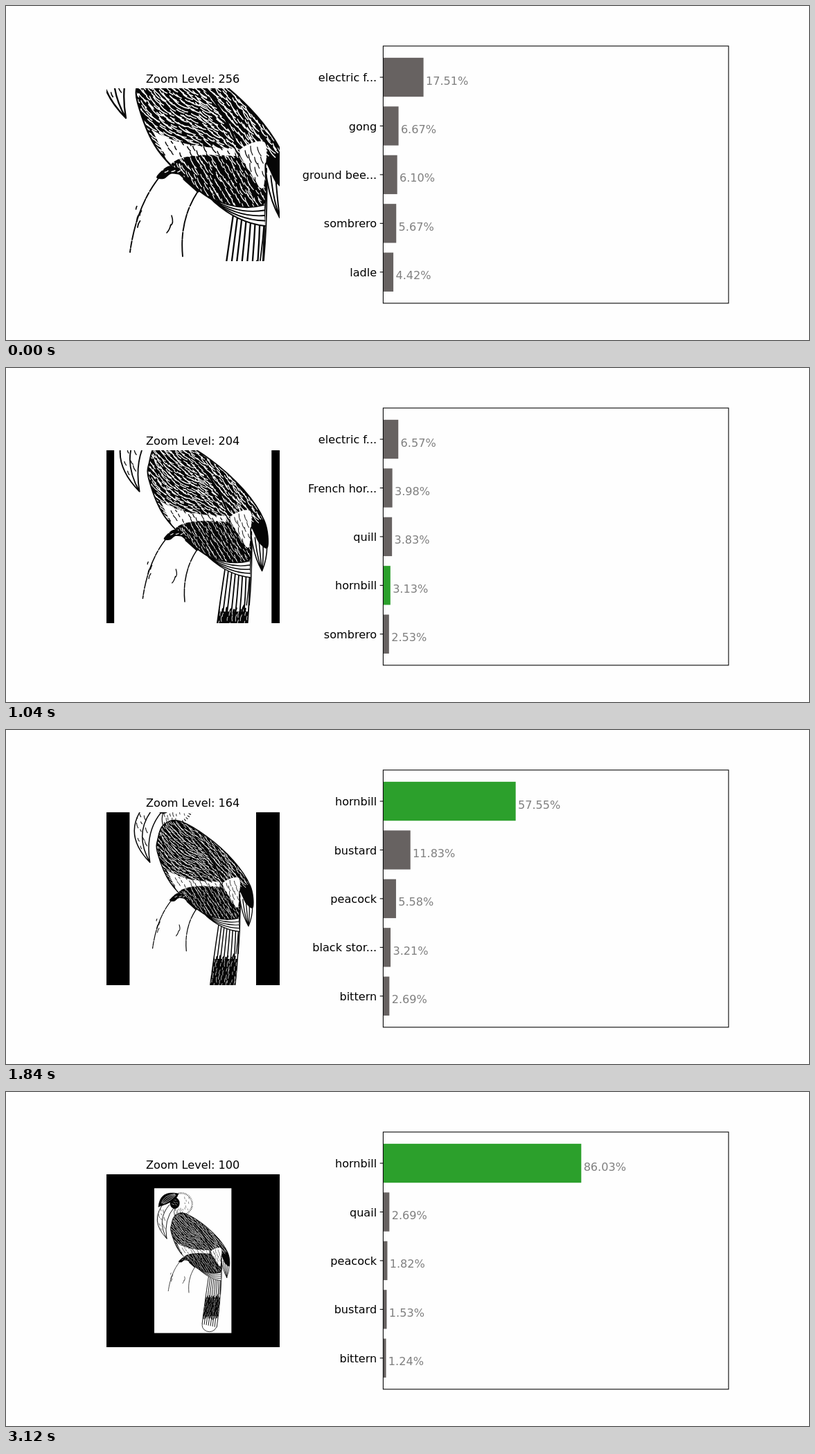
Write an HTML page that moves like this. It is 1159 px wide and 483 px high and loops after 8.18 s.

```html
<!DOCTYPE html>
<html lang="en">
<head>
<meta charset="utf-8">
<title>Zoom level and predictions</title>
<style>
html, body { margin: 0; width: 100%; height: 100%; overflow: hidden; background: #fefefe; }
svg { display: block; width: 1159px; height: 483px; }
text { font: 16.1px "DejaVu Sans", sans-serif; white-space: pre; }
</style>
</head>
<body>
<svg id="stage" viewBox="0 0 1159 483"></svg>
<script>
const STEP = 80, LAST = 39, LOOP = 8180;
const CX = 269.7, CY = 243.9;
const AXIS = 544.4, TOP = 57.9, PITCH = 70.44, PER = 3.3233;
const INK = '#060606', PAPER = '#fefefe';

// Predictions in percent at certain steps; the steps between are eased.
const KEYS = [
  [0, { 'electric f...': 17.51, 'gong': 6.67, 'ground bee...': 6.10, 'sombrero': 5.67, 'ladle': 4.42 }],
  [8, { 'electric f...': 7.43, 'quill': 4.13, 'French hor...': 2.80, 'sombrero': 2.56, 'gong': 2.36 }],
  [17, { 'French hor...': 9.71, 'hornbill': 9.15, 'peacock': 4.39, 'ground bee...': 3.49, 'zebra': 3.01 }],
  [23, { 'hornbill': 57.55, 'bustard': 11.83, 'peacock': 5.58, 'black stor...': 3.21, 'bittern': 2.69 }],
  [29, { 'hornbill': 60.05, 'peacock': 4.25, 'bustard': 3.57, 'zebra': 2.83, 'fly': 2.83 }],
  [33, { 'hornbill': 92.04, 'peacock': 1.89, 'bustard': 0.95, 'quail': 0.58, 'vulture': 0.38 }],
  [39, { 'hornbill': 86.03, 'quail': 2.69, 'peacock': 1.82, 'bustard': 1.53, 'bittern': 1.24 }]
];

const stage = document.getElementById('stage');

function add(parent, tag, attrs) {
  const el = document.createElementNS('http://www.w3.org/2000/svg', tag);
  for (const k in attrs) el.setAttribute(k, attrs[k]);
  parent.appendChild(el);
  return el;
}

let seed = 11;
function rnd() {
  seed = (seed * 16807) % 2147483647;
  return seed / 2147483647;
}

const points = list => list.split(' ').map(s => s.split(',').map(Number));
const mix = (a, b, k) => a + (b - a) * k;

// Closed smooth outline through a few points.
function blob(list) {
  const p = points(list), n = p.length, at = i => p[(i + n) % n];
  let d = 'M' + p[0];
  p.forEach((b, i) => {
    const a = at(i - 1), c = at(i + 1), e = at(i + 2);
    d += `C${b.map((v, k) => v + (c[k] - a[k]) / 6)} ${c.map((v, k) => v - (e[k] - b[k]) / 6)} ${c}`;
  });
  return d + 'Z';
}

// An arc is "start control end"; a leaf is the area between two arcs.
const arc = list => { const [a, b, c] = points(list); return `M${a}Q${b} ${c}`; };
function leaf(one, two) {
  const [a, b, c] = points(two);
  return `${arc(one)}L${c}Q${b} ${a}Z`;
}

// Arcs blended evenly between two arcs, both ends included.
function fan(one, two, n) {
  const p = points(one), q = points(two);
  let d = '';
  for (let i = 0; i <= n; i++) {
    d += arc(p.map((a, j) => a.map((v, k) => mix(v, q[j][k], i / n))).join(' '));
  }
  return d;
}

// Jittered short strokes over a box, turned by angle(x, y) in degrees.
function hatch(x0, y0, x1, y1, gx, gy, len, angle) {
  let d = '', row = 0;
  for (let y = y0; y < y1; y += gy, row++) {
    for (let x = x0 + (row % 2) * gx / 2; x < x1; x += gx) {
      const px = x + (rnd() - 0.5) * gx * 0.6, py = y + (rnd() - 0.5) * gy * 0.6;
      const a = (angle(px, py) + (rnd() - 0.5) * 18) * Math.PI / 180;
      const l = len * (0.5 + rnd() * 0.9), c = Math.cos(a) * l, s = Math.sin(a) * l;
      d += `M${px - c / 2} ${py - s / 2}q${c / 2 - s / 7} ${s / 2 + c / 7} ${c} ${s}`;
    }
  }
  return d;
}

const defs = add(stage, 'defs', {});
function clip(id, d) {
  add(add(defs, 'clipPath', { id }), 'path', { d });
  return `url(#${id})`;
}

add(stage, 'rect', { width: 1159, height: 483, fill: PAPER });
const view = add(stage, 'g', { 'clip-path': clip('view', 'M145 119h250v250h-250z') });
const backdrop = add(view, 'rect', { x: 145, y: 119, width: 250, height: 250 });
const bird = add(view, 'g', { 'stroke-linecap': 'round', 'stroke-linejoin': 'round' });

const fill = (d, color, width = 0) =>
  add(bird, 'path', { d, fill: color, stroke: INK, 'stroke-width': width });
const line = (d, width, color = INK, more = {}) =>
  add(bird, 'path', { d, fill: 'none', stroke: color, 'stroke-width': width, ...more });

function drawBranch() {
  const rough = { 'stroke-dasharray': '24 2.5 9 2' };
  line(arc('221,248 188,290 179,356'), 1.9, INK, rough);
  line(arc('277,268 250,309 255,362'), 1.9, INK, rough);
  line(hatch(190, 292, 196, 324, 6, 8, 8, () => 110), 1.7);
  line(arc('239,303 243,315 237,318') + arc('238,316 236,324 232,328'), 1.6);
}

function drawTail() {
  const left = '328,302 312,410 304,478', right = '373,304 373,393 358,490';
  const area = { 'clip-path': clip('tail', leaf(left, right)) };
  add(bird, 'ellipse', { cx: 331, cy: 483, rx: 27, ry: 24, fill: PAPER, stroke: INK, 'stroke-width': 2 });
  fill(leaf(left, right), PAPER);
  line(fan(left, right, 7), 2.3);
  line('M300 415H380', 70, INK, area);
  line(hatch(306, 380, 372, 384, 6, 9, 14, () => 95) + hatch(306, 450, 372, 454, 6, 9, 14, () => 95), 3, INK, area);
  line(hatch(308, 384, 372, 448, 9, 9, 9, () => 98), 1.1, PAPER, area);
  line(fan('375,235 376,300 367,368', '376,235 378,300 372,368', 1), 1.8);
}

function drawHead() {
  const outer = '165,28 107,95 173,162', inner = '201,46 161,92 173,162';
  const beak = leaf(outer, inner);
  fill(beak, PAPER);
  line(fan(outer, inner, 2), 2.3);
  line(hatch(140, 60, 166, 150, 11, 16, 10, () => 65), 1.6, INK, { 'clip-path': clip('beak', beak) });

  add(bird, 'ellipse', { cx: 203, cy: 31, rx: 18, ry: 21, fill: INK });
  line(hatch(196, 20, 214, 44, 9, 8, 7, () => 30), 1.4, PAPER);
  const crown = '143,44 148,-18 216,-4', brim = '143,44 212,24 216,-4';
  fill(leaf(crown, brim), INK, 2);
  line(fan('154,30 162,2 202,-3', '162,33 190,20 206,2', 3), 1.6, PAPER);

  line(arc('203,50 198,62 202,77'), 1.8);
  line(hatch(205, 56, 236, 74, 7, 8, 7, () => 78), 1.4);
  line('M217 -5A40 40 0 0 1 236 74', 6, INK, { 'stroke-linecap': 'butt', 'stroke-dasharray': '1.7 4' });
  line(hatch(240, 12, 254, 56, 12, 10, 6, () => 85), 1.2);
}

function drawBody() {
  const body = blob('203,78 237,68 300,103 361,158 399,215 405,262 390,254 375,228 373,284 330,292 280,268 219,208 190,140 191,108');
  const area = { 'clip-path': clip('body', body) };
  const tip = ['375,240 380,280 395,306', '404,262 404,285 395,306'];
  fill(leaf(...tip), PAPER);
  line(fan(...tip, 4), 2);

  // Feathers fan out from the shoulder and steepen toward the back.
  const lean = (x, y) => y > 217 ? 60 : x > 325 ? 54 : 24 + Math.abs(x - 262) * 0.36 + (170 - y) * 0.12;
  fill(body, INK);
  line(hatch(188, 72, 408, 214, 9, 5, 12, lean), 1.5, PAPER, area);
  line(hatch(238, 217, 375, 292, 8, 6, 9, lean), 1.2, PAPER, area);
  line(arc('274,105 312,142 334,203'), 3.2);

  fill(leaf('211,179 250,206 329,206', '236,232 248,210 331,217'), PAPER);
  line(hatch(228, 198, 322, 218, 13, 8, 7, () => 60), 1.5, INK, area);
  fill(blob('338,208 373,197 374,240 369,264 350,236'), PAPER);
  line(hatch(346, 212, 371, 253, 9, 10, 10, () => 75), 1.2);
  line(body, 2.3);

  const vent = ['294,277 335,298 372,288', '300,283 335,314 374,318'];
  fill(leaf(...vent), PAPER);
  line(fan(...vent, 4), 1.8);

  fill(blob('218,247 236,232 255,243 238,242 228,249'), INK, 1.5);
  line('M258 250L277 267', 5);
  line(hatch(225, 238, 250, 242, 8, 5, 4, () => -20), 1.4, PAPER);
}

add(bird, 'rect', { x: CX - 142.5, y: CY - 268, width: 285, height: 536, fill: PAPER });
[drawBranch, drawTail, drawHead, drawBody].forEach(draw => draw());

const title = add(stage, 'text', { x: CX, y: 111, 'text-anchor': 'middle' });
const frame = { stroke: '#000', 'stroke-width': 1.07, fill: 'none' };

const rows = [0, 1, 2, 3, 4].map(i => {
  const mid = CY + (i - 2) * PITCH;
  const bar = add(stage, 'rect', { x: AXIS, y: mid - PITCH * 0.4, height: PITCH * 0.8 });
  add(stage, 'path', { d: `M${AXIS - 4.7} ${mid}H${AXIS}`, ...frame });
  const name = add(stage, 'text', { x: AXIS - 9.2, y: mid + 6.1, 'text-anchor': 'end' });
  const value = add(stage, 'text', { y: mid + PITCH * 0.15, fill: '#808080' });
  return { bar, name, value };
});
add(stage, 'rect', { x: AXIS, y: TOP, width: 150 * PER, height: PITCH * 5.28, ...frame });

// Five best labels at a step; a label missing from a key sits just below its last place.
function scores(step) {
  const next = KEYS.findIndex(([s]) => s > step);
  const i = next < 0 ? KEYS.length - 1 : next - 1;
  const [s0, a] = KEYS[i], [s1, b] = KEYS[i + 1] || [s0 + 1, a];
  const k = ((step - s0) / (s1 - s0)) ** 3;
  const get = (set, n) => set[n] ?? 0.8 * Math.min(...Object.values(set));
  return Object.keys({ ...a, ...b })
    .map(n => [n, mix(get(a, n), get(b, n), k)])
    .sort((p, q) => q[1] - p[1]).slice(0, 5);
}

let shown = -1;
function render(t) {
  const step = Math.min(LAST, Math.floor((t % LOOP) / STEP));
  if (step === shown) return;
  shown = step;
  const zoom = 256 - 4 * step;
  title.textContent = 'Zoom Level: ' + zoom;
  bird.setAttribute('transform', `translate(${CX} ${CY}) scale(${zoom / 256}) translate(${-CX} ${-CY})`);
  backdrop.setAttribute('fill', zoom < 224 ? '#000' : PAPER);
  scores(step).forEach(([n, v], i) => {
    const { bar, name, value } = rows[i];
    bar.setAttribute('width', v * PER);
    bar.setAttribute('fill', n === 'hornbill' ? '#2ca02c' : '#676261');
    name.textContent = n;
    value.textContent = v.toFixed(2) + '%';
    value.setAttribute('x', AXIS + (v + 1) * PER);
  });
}

const start = performance.now();
function tick() {
  render(performance.now() - start);
  requestAnimationFrame(tick);
}
tick();
</script>
</body>
</html>
```
